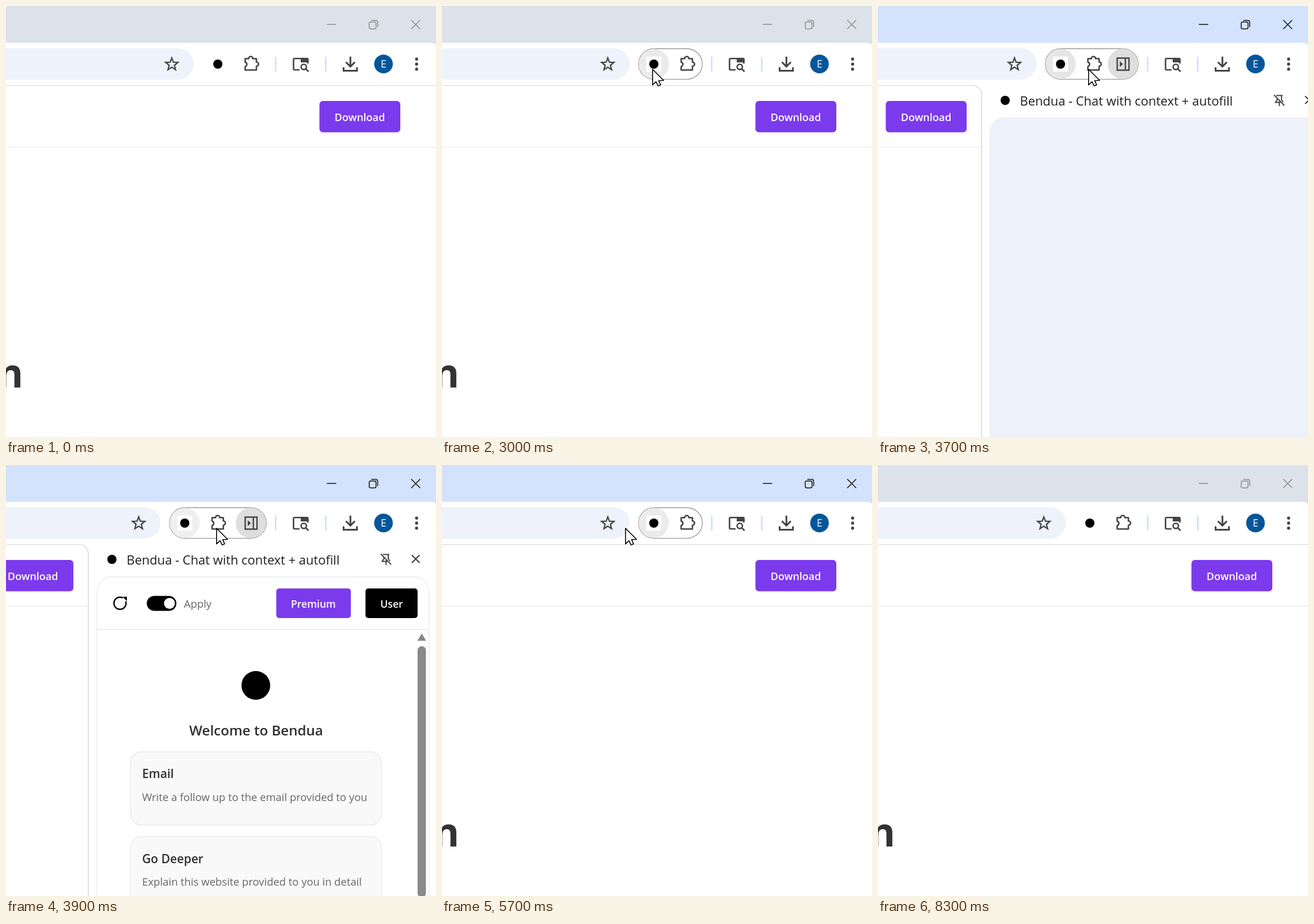
These frames come from a looping animation (747x749 px, 8500 ms). An HTML page:

```html
<!DOCTYPE html>
<html lang="en">
<head>
<meta charset="utf-8">
<title>Side panel demo</title>
<style>
html, body { margin: 0; width: 100%; height: 100%; overflow: hidden; background: #fff }
svg { display: block; width: 747px; height: 749px; font-family: "Open Sans", "Noto Sans", sans-serif }
.line { fill: none; stroke: #444; stroke-width: 2.6 }
.thin { fill: none; stroke-width: 1.5 }
.semi { font-weight: 600; fill: #303030 }
.btn { font-weight: 600; fill: #fff; text-anchor: middle }
.hint { font-size: 18.4px; fill: #666 }
.card { fill: #f9f9f9; stroke: #e8e8e8; stroke-width: 1.3 }
</style>
</head>
<body>
<svg viewBox="0 0 747 749">
  <rect width="747" height="749" fill="#fff"/>

  <!-- web page -->
  <path id="rule" stroke="#ebebeb" stroke-width="1.5"/>
  <text id="heading" x="30" y="663" text-anchor="end" font-size="69" font-weight="700" fill="#333">n</text>
  <g id="download">
    <rect x="544.5" y="165" width="140.5" height="54.5" rx="6" fill="#7c3aed"/>
    <text class="btn" x="614.7" y="200" font-size="18">Download</text>
  </g>
  <rect id="frame" x="-50" y="138.3" height="700" rx="16" fill="none" stroke="#d9dbde" stroke-width="1.6"/>

  <!-- side panel -->
  <g id="panel">
    <circle cx="184" cy="164" r="8"/>
    <text x="209.5" y="172.5" font-size="21.9" font-weight="500" fill="#1f1f1f">Bendua - Chat with context + autofill</text>
    <path class="line" style="stroke-width:2" d="M651 154.5L669 173M655 155.5H666M664 156V163L667 167M660.3 166V174M656.5 160.5V163L653.5 167.5H662"/>
    <path class="line" style="stroke-width:2.2" d="M705 156.500l13.500 13.500m0-13.500l-13.500 13.500"/>
    <rect id="body" x="158" y="194.500" width="577" height="620" rx="26" stroke="#e6eaf2" stroke-width="1.300"/>
    <g id="content">
      <path d="M158 286H735" stroke="#e8e8e8" stroke-width="1.5"/>
      <path d="M208 237A10.5 10.5 0 1 1 203 231" fill="none" stroke="#000" stroke-width="2.5"/>
      <path d="M202.500 229H210V236.500Z"/>
      <rect x="244.500" y="227.500" width="51.500" height="26" rx="13"/>
      <circle cx="284" cy="240.500" r="9.500" fill="#fff"/>
      <text class="hint" x="309" y="248">Apply</text>
      <rect x="469.500" y="214.500" width="129.500" height="51.500" rx="5" fill="#7c3aed"/>
      <text class="btn" x="534" y="248" font-size="17.600">Premium</text>
      <rect x="624.500" y="214.500" width="90.500" height="51.500" rx="5"/>
      <text class="btn" x="670" y="248" font-size="17.600">User</text>
      <path d="M722.300 293.500L729 305H715.500Z" fill="#888" stroke="#888" stroke-linejoin="round"/>
      <rect x="715" y="315" width="14.500" height="436" rx="7" fill="#8a8a8a"/>
      <circle cx="434" cy="383" r="25"/>
      <text class="semi" x="434.500" y="469.500" font-size="24.100" text-anchor="middle">Welcome to Bendua</text>
      <rect class="card" x="216.500" y="498.500" width="435.500" height="127" rx="19"/>
      <text class="semi" x="236.500" y="544" font-size="20.800">Email</text>
      <text class="hint" x="236.500" y="584">Write a follow up to the email provided to you</text>
      <rect class="card" x="216.500" y="645.500" width="435.500" height="127" rx="19"/>
      <text class="semi" x="236.500" y="691.500" font-size="20.800">Go Deeper</text>
      <text class="hint" x="236.500" y="731">Explain this website provided to you in detail</text>
    </g>
  </g>

  <!-- browser bars -->
  <rect id="titlebar" width="747" height="80"/>
  <path d="M0 64H737Q747 64 748 71V137.500H0Z" fill="#fff"/>
  <g id="winbuttons" class="thin">
    <path d="M557.500 32H573.500M704 24.500l15.500 15.500m0-15.500l-15.500 15.500"/>
    <rect x="631" y="27.700" width="11.800" height="12" rx="2.500"/>
    <path d="M634.500 25H642Q645.700 25 645.700 28.700V36.500"/>
  </g>
  <g id="address">
    <rect x="-100" y="73.500" width="426" height="54.500" rx="27" fill="#edf2fb"/>
    <path id="star" class="line" style="stroke-width:2.300"/>
  </g>
  <rect id="pill" y="74.200" height="53.200" rx="26.600" fill="#fff" stroke="#9a9a9a" stroke-width="1.400"/>
  <g id="tools">
    <circle id="hover" cx="368" cy="100.800" r="26.300"/>
    <rect x="355" y="88" width="26" height="26" fill="#fff"/>
    <circle cx="368" cy="101" r="8"/>
  </g>
  <circle id="toggleBg" cx="425.500" cy="100.800" r="26.500" fill="#dedede"/>
  <path id="puzzle" class="line" stroke-linejoin="round" d="M415.500 91.500H421.500A3.700 3.700 0 0 1 428.900 91.500H435V97.300A3.700 3.700 0 0 1 435 104.700V111.300H415.500V105.200A4 4 0 0 0 415.500 97.500Z"/>
  <g id="toggle">
    <path class="line" style="stroke-width:2.400" d="M415.500 90.500H436V111.500H415.500ZM429.700 90.500V111.500"/>
    <path d="M420 96L425.500 101L420 106Z" fill="#444"/>
  </g>
  <path d="M468.500 89.500V112.500M555.500 89.500V112.500" stroke="#d3e3fd" stroke-width="3" stroke-linecap="round"/>
  <rect class="line" x="499.500" y="91.300" width="24.800" height="19.700" rx="2"/>
  <path d="M512 90H523.500Q525.600 90 525.600 92.500V98H512Z" fill="#444"/>
  <path d="M510 100H527V115H510Z" fill="#fff"/>
  <circle class="line" cx="517.300" cy="105.800" r="4.600"/>
  <path class="line" d="M520.500 109L525.500 114"/>
  <path class="line" style="stroke-width:3" d="M598.300 88V105M590.500 97.500L598.300 105.300L606 97.500M586.500 106.500V112.500H609.700V106.500"/>
  <circle cx="655.800" cy="100.800" r="16.200" fill="#04569b"/>
  <text x="655.800" y="107.200" font-size="17.500" fill="#fff" text-anchor="middle">E</text>
  <path d="M713.300 92.300v0M713.300 101v0M713.300 109.700v0" stroke="#444" stroke-width="5.400" stroke-linecap="round"/>

  <path id="cursor" d="M.8 0V27.200L6.800 21.600L10.500 29L14.800 27L11.500 19.800L20 19.200Z" fill="#fff" stroke="#000" stroke-width="1.600" stroke-linejoin="round"/>
</svg>
<script>
const LOOP = 8500, STEP = 100;
const $ = id => document.getElementById(id);
const set = (id, attrs) => { for (const k in attrs) $(id).setAttribute(k, attrs[k]); };
const move = (id, x, y = 0) => set(id, { transform: `translate(${x} ${y})` });
const span = (t, a, b) => Math.min(1, Math.max(0, (t - a) / (b - a)));
const ease = u => u < .5 ? 4 * u ** 3 : 1 - 4 * (1 - u) ** 3;

// Linear interpolation over [time, value] pairs.
function track(t, keys) {
  let [t0, v0] = keys[0];
  for (const [t1, v1] of keys) {
    if (t < t1) return v0 + (v1 - v0) * span(t, t0, t1);
    [t0, v0] = [t1, v1];
  }
  return v0;
}
const PANEL = [[3400, 0], [3500, .018], [3600, .56], [3700, .939], [3800, .988], [3900, 1],
  [5300, 1], [5400, .95], [5500, .5], [5600, .08], [5700, 0]];
const TOOLS = [[3500, 0], [3600, .45], [3700, .885], [3800, .975], [3900, 1],
  [5300, 1], [5400, .95], [5500, .5], [5600, .08], [5700, 0]];
const TOGGLE = [[3400, 0], [3500, .65], [3600, 1], [5300, 1], [5600, 0]];

const starPoints = Array.from({ length: 10 }, (_, i) => {
  const a = i * Math.PI / 5, r = i % 2 ? 4.8 : 11.3;
  return [288 + r * Math.sin(a), 101.5 - r * Math.cos(a)].map(v => v.toFixed(1));
});
set("star", { d: "M" + starPoints.join("L") + "Z" });

function draw(t) {
  const open = track(t, PANEL), shift = 57.5 * track(t, TOOLS);
  const edge = 749 - 606 * open, frameEdge = open ? edge : 800;
  const centred = (749 - edge) / 2;

  set("rule", { d: `M0 245.500H${frameEdge}` });
  set("frame", { width: frameEdge + 50 });
  move("heading", -centred);
  move("download", Math.min(685 - centred, edge - 26) - 685);

  move("panel", edge - 143);
  set("panel", { opacity: open ? 1 : 0 });
  const loaded = t >= 3900;
  set("body", { fill: loaded ? "#fff" : "#edf1fa" });
  set("content", { opacity: loaded ? 1 : 0 });

  const active = t >= 3400 && t < 8200, fading = t >= 8200 && t < 8300;
  set("titlebar", { fill: active ? "#d3e3fd" : fading ? "#d8e3f2" : "#dce2e9" });
  set("winbuttons", { stroke: active ? "#111" : fading ? "#555" : "#8b8f93" });

  move("address", -shift);
  move("tools", -shift);
  move("puzzle", -shift);
  const hover = t < 2900 ? 0 : 1 - span(t, 6800, 7200);
  set("pill", { x: 341.5 - shift, width: 110.700 + shift, opacity: hover });
  const shade = t < 3400 ? "#ebebeb" : t < 3700 ? "#e0e0e0" : t < 3800 ? "#e6e6e6" : t < 5400 ? "#efefef" : "#ebebeb";
  set("hover", { fill: shade, opacity: hover });
  const toggle = track(t, TOGGLE);
  set("toggle", { opacity: toggle });
  set("toggleBg", { opacity: Math.min(1, toggle * 1.5) });

  const rise = ease(span(t, 2100, 3000)), back = ease(span(t, 4200, 4600));
  move("cursor", 87 + 278 * rise - 47 * back, 697 - 587 * rise);
  set("cursor", { opacity: t >= 2100 && t < 6900 ? 1 : 0 });
}

const start = performance.now();
function tick() {
  const t = (performance.now() - start) % LOOP;
  draw(Math.floor(t / STEP) * STEP);
  requestAnimationFrame(tick);
}
tick();
</script>
</body>
</html>
```
